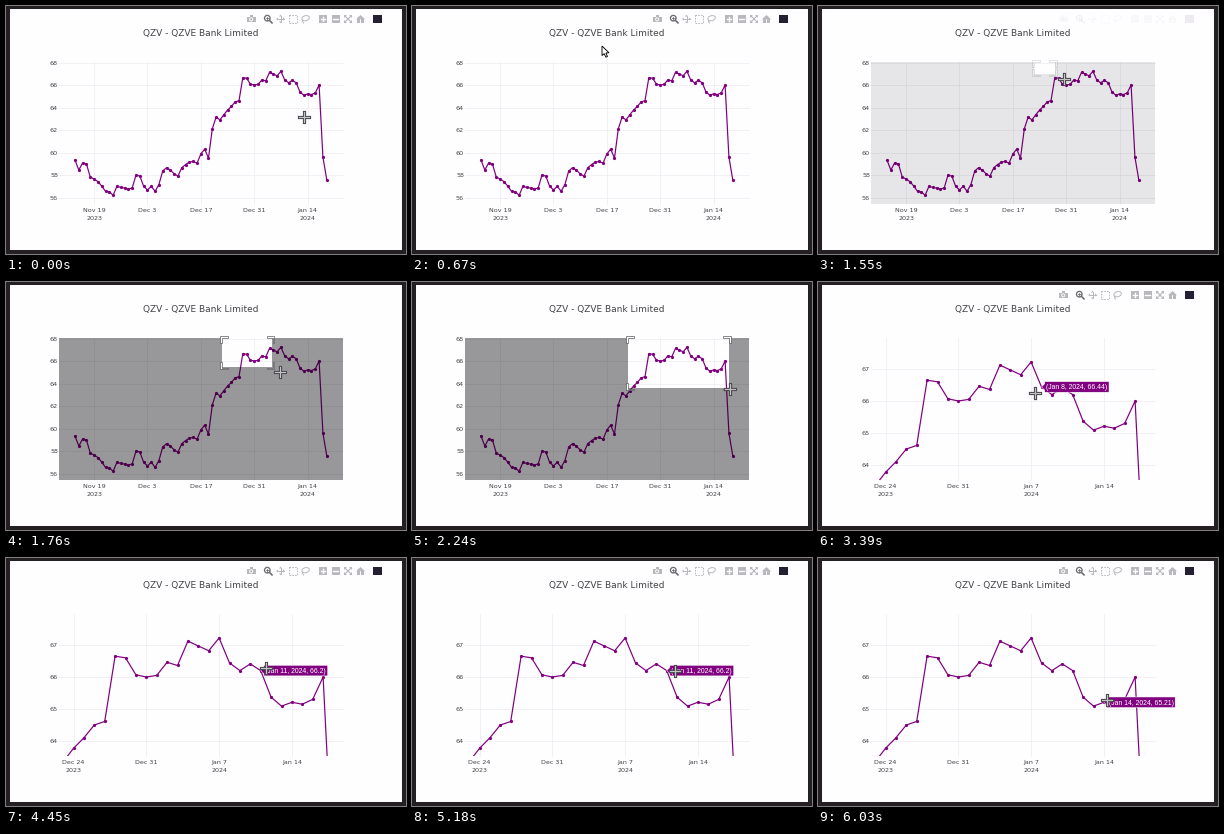
These frames come from a looping animation (400x248 px, 6.06 s). A matplotlib script:

```python
import numpy as np
import matplotlib.pyplot as plt
from matplotlib.animation import FuncAnimation
from matplotlib.lines import Line2D
from matplotlib.patches import Circle, Ellipse, PathPatch, Polygon, Rectangle
from matplotlib.path import Path

W, H, DPI = 400, 248, 100
FRAMES, STEP = 202, 30
PT = 72 / DPI            # points per pixel
S = 0.533
LEFT, TOP, RIGHT, BOTTOM = 53, 56, 337, 198
PURPLE, INK, GRID = "#800080", "#444444", "#efedf0"
PAPER, BORDER = "#fefdff", "#231f22"
ICON, ICON_ON = "#b9b8bc", "#6d6c70"

# Moments of the drag, in ms
GRAB, DIM, RELEASE = 1290, 1450, 2820
START = (216.3, 56)

PRICES = np.array([
    59.33, 58.44, 59.07, 58.98, 57.82, 57.64, 57.42, 57.02, 56.55, 56.5,
    56.2, 57, 56.89, 56.84, 56.75, 56.85, 58, 57.9, 57, 56.67,
    57, 56.55, 57.15, 58.36, 58.65, 58.44, 58.1, 57.9, 58.65, 58.93,
    59.15, 59.2, 59.05, 59.87, 60.3, 59.5, 62.1, 63.15, 62.9, 63.35,
    63.77, 64.1, 64.5, 64.61, 66.65, 66.6, 66.07, 66, 66.05, 66.46,
    66.36, 67.12, 66.97, 66.82, 67.22, 66.44, 66.2, 66.41, 66.2, 65.37,
    65.09, 65.21, 65.15, 65.3, 66, 59.6, 57.6])
DAYS = np.arange(len(PRICES))

# Pointer path: time, x, y
ROUTE = np.array([
    (0, 298, 111), (120, 294, 109), (520, 198, 52), (600, 190, 40),
    (860, 190, 40), (1180, 216, 57), (1330, 216, 57), (1550, 248.5, 75),
    (1750, 276, 91), (2120, 316, 106), (2240, 318, 107), (2420, 320.5, 107.5),
    (2900, 320.5, 107.5), (3280, 216.5, 111), (3500, 216.5, 111),
    (3850, 240, 102), (4100, 249, 102), (4330, 260, 109.5),
    (5120, 260, 109.5), (5480, 289, 142), (6060, 289, 142)])

fig = plt.figure(figsize=(W / DPI, H / DPI), dpi=DPI, facecolor=BORDER)
ax = fig.add_axes([0, 0, 1, 1])
ax.set(xlim=(0, W), ylim=(H, 0))
ax.axis("off")


def put(artist, z=1):
    artist.set_zorder(z)
    ax.add_artist(artist)
    return artist


def rect(x0, y0, x1, y1, z=1, **kw):
    return put(Rectangle((x0, y0), x1 - x0, y1 - y0, **{"lw": 0, **kw}), z)


def line(xs, ys, color, width, z=1, **kw):
    return put(Line2D(xs, ys, color=color, lw=width * PT, **kw), z)


def text(x, y, s, size, color=INK, z=3, font="DejaVu Sans", **kw):
    return ax.text(x, y, s, fontsize=size * PT, color=color, zorder=z,
                   family=font, va="baseline", **kw)


def day_name(i):
    if i <= 16:
        return f"Nov {14 + i}"
    return f"Dec {i - 16}" if i <= 47 else f"Jan {i - 47}"


def year(i):
    return 2023 if i < 48 else 2024


class View:
    """One zoom state of the chart: grid, tick labels and the series."""

    def __init__(self, day0, x0, dx, v0, y0, dy, xticks, yticks, year_ticks):
        self.xs = x0 + (DAYS - day0) * dx
        self.ys = y0 - (PRICES - v0) * dy
        self.parts = []
        add = self.parts.append
        for i in xticks:
            x = self.xs[i]
            add(line([x, x], [TOP, BOTTOM], GRID, 0.8))
            add(text(x, 205.6, day_name(i), 12 * S, ha="center"))
            if i in year_ticks:
                add(text(x, 213.6, str(year(i)), 12 * S, ha="center"))
        for v in yticks:
            y = y0 - (v - v0) * dy
            add(line([LEFT, RIGHT], [y, y], GRID, 0.8))
            add(text(52, y + 2.4, str(v), 12 * S, ha="right"))
        curve = line(self.xs, self.ys, PURPLE, 1.2, 2, marker="o",
                     ms=3.2 * PT, mew=0)
        curve.set_clip_path(Rectangle((LEFT, TOP), RIGHT - LEFT, BOTTOM - TOP,
                                      transform=ax.transData))
        add(curve)

    def show(self, on):
        for p in self.parts:
            p.set_visible(on)

    def nearest(self, x, y):
        d = np.hypot(self.xs - x, self.ys - y)
        i = int(d.argmin())
        return i if d[i] < 20.5 * S else None


def modebar():
    """Toolbar icons; returns their artists for fading."""
    y = 13
    out = [
        rect(241, 10.5, 249.5, 16.3, color=ICON),
        rect(243.5, 9.3, 247, 11, color=ICON),
        put(Circle((245.2, 13.4), 2, color=PAPER, lw=0), 2),
        put(Circle((245.2, 13.4), 1.1, color=ICON, lw=0), 3),
        put(Circle((261.3, 12.2), 2.8, fill=False, ec=ICON_ON, lw=1.3 * PT)),
        line([263.4, 266], [14.3, 16.9], ICON_ON, 1.6),
        line([260, 262.6], [12.2, 12.2], ICON_ON, 0.8),
        line([261.3, 261.3], [10.9, 13.5], ICON_ON, 0.8),
        line([271.5, 277.5], [y, y], ICON, 1),
        line([274.5, 274.5], [10, 16], ICON, 1),
        rect(283.3, 9.3, 290.7, 16.7, fill=False, ec=ICON, lw=PT,
             ls=(0, (1.6, 1.2))),
        put(Ellipse((299.6, 12.2), 7.6, 5, angle=-15, fill=False, ec=ICON,
                    lw=PT)),
        line([297, 296.4, 297.6], [14.2, 15.6, 17], ICON, 1),
        rect(313, 9, 321, 17, color=ICON),
        line([314.8, 319.2], [y, y], PAPER, 1.4, 2),
        line([317, 317], [10.8, 15.2], PAPER, 1.4, 2),
        rect(325.5, 9, 333.5, 17, color=ICON),
        line([327.3, 331.7], [y, y], PAPER, 1.4, 2),
        line([339, 345], [10, 16], ICON, 1.1),
        line([339, 345], [16, 10], ICON, 1.1),
        put(Polygon([(350, 13.2), (354.5, 9), (359, 13.2)], color=ICON, lw=0)),
        rect(351.4, 13, 353.8, 16.6, color=ICON),
        rect(355.2, 13, 357.6, 16.6, color=ICON),
        rect(367, 8.5, 376, 17, color="#251f33"),
    ]
    for sx, sy in ((1, 0), (-1, 0), (0, 1), (0, -1)):
        tip = np.array([274.5 + 4.3 * sx, y + 4.3 * sy])
        back = tip - np.array([sx, sy]) * 1.8
        side = np.array([sy, sx]) * 1.6
        out.append(put(Polygon([tip, back + side, back - side], color=ICON,
                               lw=0)))
    for sx in (-1, 1):
        for sy in (-1, 1):
            cx, cy = 342 + 4 * sx, y + 4 * sy
            out.append(put(Polygon([(cx, cy), (cx - 3 * sx, cy),
                                    (cx, cy - 3 * sy)], color=ICON, lw=0)))
    return out


def loops(polys):
    return Path.make_compound_path(
        *[Path(list(p) + [p[0]], closed=True) for p in polys])


def corners(x0, y0, x1, y1):
    n = min(x1 - x0, y1 - y0, 20 * S) / 2
    a, b = 3.5 * S, 0.5 * S
    ell = [(-a, n), (-b, n), (-b, -b), (n, -b), (n, -a), (-a, -a)]
    return loops([[(cx + sx * u, cy + sy * v) for u, v in ell]
                  for cx, sx in ((x0, 1), (x1, -1))
                  for cy, sy in ((y0, 1), (y1, -1))])


def pointer(t):
    ts = t + np.linspace(-40, 40, 9)
    return [np.interp(ts, ROUTE[:, 0], ROUTE[:, k]).mean() for k in (1, 2)]


def ease(t):
    t = min(max(t, 0), 1)
    return 4 * t ** 3 if t < 0.5 else 1 - (2 - 2 * t) ** 3 / 2


rect(4, 3, 396, 244, 0, color=PAPER)
text(195, 30.3, "QZV - QZVE Bank Limited", 17 * S, ha="center")
full = View(0, 69, 3.814, 56, 191.5, 11.25, range(5, 62, 14),
            range(56, 69, 2), (5, 61))
zoomed = View(40, 67.5, 10.4, 64, 183, 32, range(40, 62, 7),
              range(64, 68), (40, 54))
bar = modebar()

shade = put(PathPatch(Path([(0, 0)]), fc="black", lw=0), 5)
marks = put(PathPatch(Path([(0, 0)]), fc="white", ec=INK, lw=0.6 * PT), 6)

tag = put(Polygon([(0, 0)] * 3, fc=PURPLE, ec="white", lw=0.5 * PT), 7)
tag_text = text(0, 0, "", 13 * S, "white", 8, "Liberation Sans")

ARROW = np.array([(0, 0), (0, 9.6), (2.2, 7.6), (3.8, 11.2), (5.5, 10.5),
                  (3.9, 7), (7, 6.8)])
arrow = put(Polygon(ARROW, fc="white", ec="black", lw=0.9 * PT), 10)
cross = [line([0], [0], c, w, 9 + k, solid_capstyle="projecting")
         for k, (c, w) in enumerate((("#4b494d", 3.2), ("#c4c3c6", 1.1)))]


def draw_tag(view, i):
    on = i is not None
    tag.set_visible(on)
    tag_text.set_visible(on)
    if not on:
        return
    x, y = view.xs[i], view.ys[i]
    tag_text.set_text(f"({day_name(i)}, {year(i)}, {PRICES[i]:g})")
    tag_text.set_position((x + 9 * S, y + 2.4))
    width = tag_text.get_window_extent(fig.canvas.get_renderer()).width
    a, h = 6 * S, 5.3
    end = x + 12 * S + width
    tag.set_xy([(x, y), (x + a, y - a), (x + a, y - h), (end, y - h),
                (end, y + h), (x + a, y + h), (x + a, y + a)])


def draw_zoom_box(t):
    on = DIM <= t < RELEASE
    shade.set_visible(on)
    marks.set_visible(on)
    if not on:
        return
    x, y = pointer(t - 60)
    x0, y0 = START
    k = ease((t - DIM) / 205)
    shade.set_path(loops([
        [(LEFT, TOP), (RIGHT, TOP), (RIGHT, BOTTOM), (LEFT, BOTTOM)],
        [(x0, y0), (x0, y), (x, y), (x, y0)]]))
    shade.set_alpha(0.4 * k)
    marks.set_path(corners(x0, y0, x, y))
    marks.set_alpha(k)


def draw_pointer(x, y, inside):
    arrow.set_visible(not inside)
    arrow.set_xy(ARROW + (x, y))
    r = 5
    for c in cross:
        c.set_visible(inside)
        c.set_data([x - r, x + r, np.nan, x, x], [y, y, np.nan, y - r, y + r])


def update(n):
    t = n * STEP
    x, y = pointer(t)
    view = zoomed if t >= RELEASE else full
    full.show(view is full)
    zoomed.show(view is zoomed)

    dragging = GRAB <= t < RELEASE
    inside = LEFT <= x <= RIGHT and TOP <= y <= BOTTOM
    draw_tag(view, view.nearest(x, y) if inside and not dragging else None)
    draw_zoom_box(t)
    draw_pointer(x, y, inside or dragging)

    if t < RELEASE:
        alpha = 1 - ease((t - GRAB) / 330)
    else:
        alpha = ease((t - RELEASE - 60) / 330)
    for p in bar:
        p.set_alpha(alpha)
    return []


anim = FuncAnimation(fig, update, frames=FRAMES, interval=STEP, repeat=True,
                     repeat_delay=0, blit=False)
plt.show()
```
